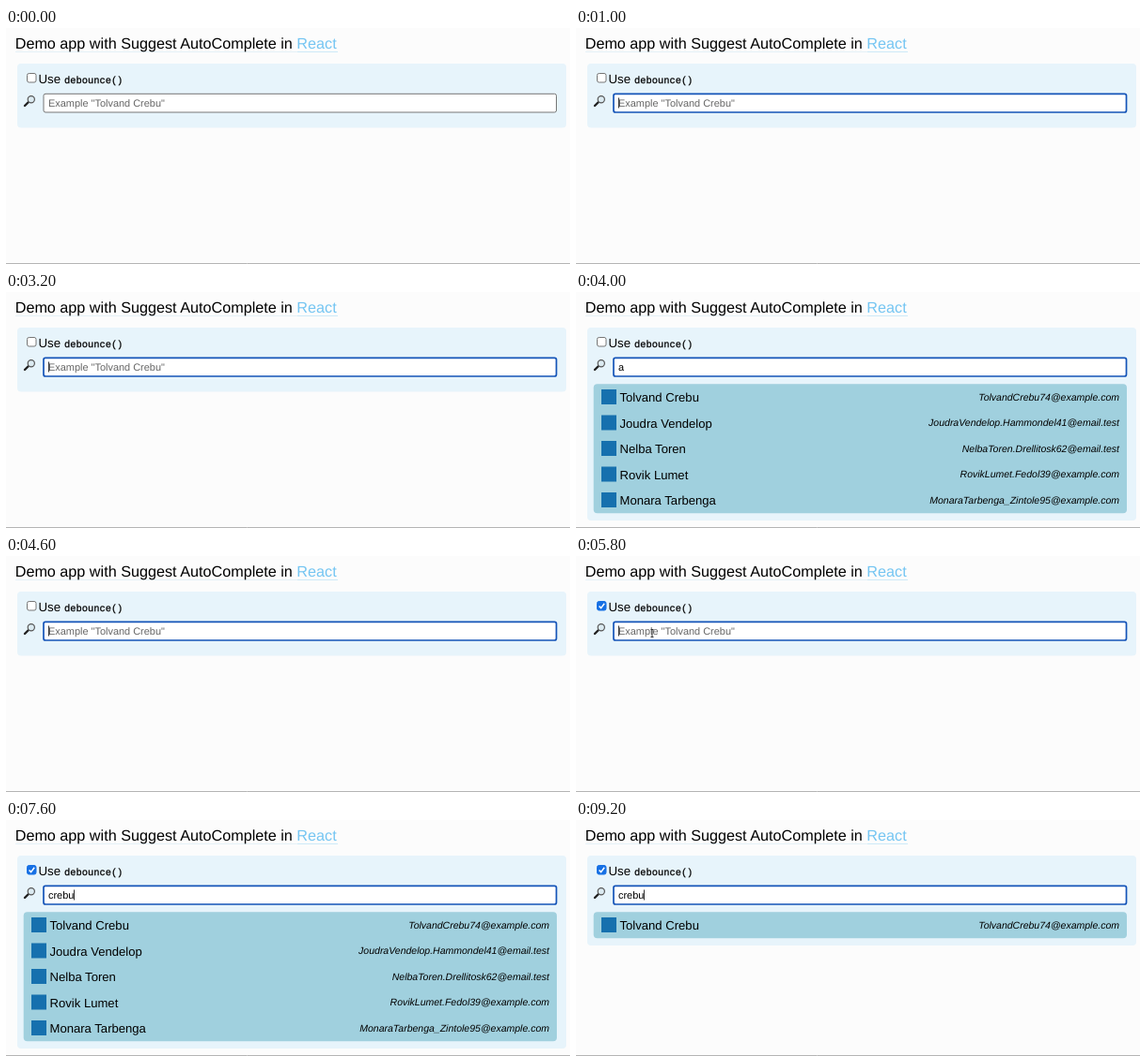
Write an HTML page that moves like this. It is 600x252 px and loops after 9.4 s.

```html
<!DOCTYPE html>
<html lang="en">
<head>
<meta charset="utf-8">
<title>Suggest AutoComplete</title>
<style>
  html, body { margin: 0; width: 100%; height: 100%; overflow: hidden; background: #fcfcfc; }
  svg { display: block; width: 600px; height: 252px; font-family: "Liberation Sans", Arial, sans-serif; text-rendering: geometricPrecision; }
  .title { font-size: 16.2px; }
  .field { font-size: 10.95px; }
  .name { font-size: 13.1px; }
  .mail { font-size: 10.5px; font-style: italic; text-anchor: end; }
  .code { font: 10.4px "Liberation Mono", "Courier New", monospace; stroke: #000; stroke-width: .25px; }
</style>
</head>
<body>
<svg viewBox="0 0 600 252">
  <rect width="600" height="252" fill="#fcfcfc"/>
  <path d="M0 251.5H600" stroke="#b4b4b4"/>
  <path d="M10 25.5H310" stroke="#e4f1f7"/>
  <path d="M310 25.5H353" stroke="#cdeaf8"/>
  <text class="title" x="9.7" y="22">Demo app with Suggest AutoComplete in <tspan fill="#74c5f2">React</tspan></text>

  <rect id="panel" x="12" y="38" width="584" rx="4" fill="#e7f4fb"/>
  <rect id="box" x="22.5" y="48.5" width="9.5" height="9.5" rx="2"/>
  <path id="tick" d="M24.6 53.4l2 2.2 3.6-4.8" fill="none" stroke="#fff" stroke-width="1.5"/>
  <text x="34.5" y="59" font-size="13.3">Use</text>
  <text class="code" x="62" y="59">debounce()</text>

  <path d="M20 83l4-4" stroke="#222" stroke-width="2.4" stroke-linecap="round"/>
  <circle cx="26.8" cy="76.2" r="3.6" fill="#dcebf2" stroke="#555" stroke-width="1.2"/>

  <rect id="input" x="40" y="70.3" width="545.5" height="19.7" rx="2" fill="#fff"/>
  <text id="hint" class="field" x="45" y="84" fill="#666">Example "Tolvand Crebu"</text>
  <text id="typed" class="field" x="45" y="84"></text>
  <path id="caret" d="M.5 74.5V85.5" stroke="#333"/>
  <path id="beam" d="M79.5 78.5h3M81 78.5v8M79.5 86.5h3" fill="none" stroke="#333"/>

  <rect id="list" x="18.7" y="98.3" width="567.3" rx="4" fill="#a0d0de"/>
  <g id="rows"></g>
</svg>
<script>
const LOOP = 9400, STEP = 200, ROW = 27.5;
const $ = id => document.getElementById(id);
const set = (id, attrs) => { for (const k in attrs) $(id).setAttribute(k, attrs[k]); };
const show = (node, on) => node.setAttribute('visibility', on ? 'visible' : 'hidden');

const people = [
  ['Tolvand Crebu', 'TolvandCrebu74@example.com'],
  ['Joudra Vendelop', 'JoudraVendelop.Hammondel41@email.test'],
  ['Nelba Toren', 'NelbaToren.Drellitosk62@email.test'],
  ['Rovik Lumet', 'RovikLumet.Fedol39@example.com'],
  ['Monara Tarbenga', 'MonaraTarbenga_Zintole95@example.com']
];
$('rows').innerHTML = people.map(([name, mail], i) => `
  <g transform="translate(0 ${i * ROW})">
    <rect x="27" y="104" width="16" height="16" fill="#1670ae"/>
    <text class="name" x="46.5" y="117">${name}</text>
    <text class="mail" x="578" y="115.5">${mail}</text>
  </g>`).join('');

// Each track is a list of [start time, value].
const text = [[0, ''], [1200, 'c'], [1600, 'cr'], [2000, 'cre'], [2200, 'creb'], [2400, 'crebu'],
  [2800, ''], [3400, 'a'], [4600, ''], [6000, 'c'], [6600, 'cr'], [6800, 'cre'], [7000, 'creb'], [7200, 'crebu']];
const results = [[0, 0], [1600, 1], [2800, 0], [3600, 5], [4600, 0], [6200, 5], [8000, 1]];
const focus = [[0, false], [800, true], [5200, false], [5600, true]];
const at = (track, t) => track.filter(([start]) => start <= t).pop();

function draw(t) {
  const [typedAt, value] = at(text, t);
  const [focusedAt, focused] = at(focus, t);
  const count = at(results, t)[1];
  const checked = t >= 5200;

  set('panel', { height: 68.5 + count * ROW });
  set('list', { height: count * ROW + .5 });
  show($('list'), count);
  [...$('rows').children].forEach((row, i) => show(row, i < count));

  set('box', checked ? { fill: '#1670e4', stroke: '#1670e4' } : { fill: '#fff', stroke: '#767676' });
  show($('tick'), checked);
  set('input', focused ? { stroke: '#1454b8', 'stroke-width': 1.7 } : { stroke: '#767676', 'stroke-width': 1 });

  $('typed').textContent = value;
  show($('hint'), !value);
  const blink = (t - Math.max(typedAt, focusedAt)) % 1000 < 500;
  const width = value ? $('typed').getComputedTextLength() : 0;
  set('caret', { transform: `translate(${Math.floor(45 + width)} 0)` });
  show($('caret'), focused && blink);
  show($('beam'), t >= 5600 && t < 6000);
}

function tick() {
  draw(Math.floor(performance.now() % LOOP / STEP) * STEP);
  requestAnimationFrame(tick);
}
tick();
</script>
</body>
</html>
```
